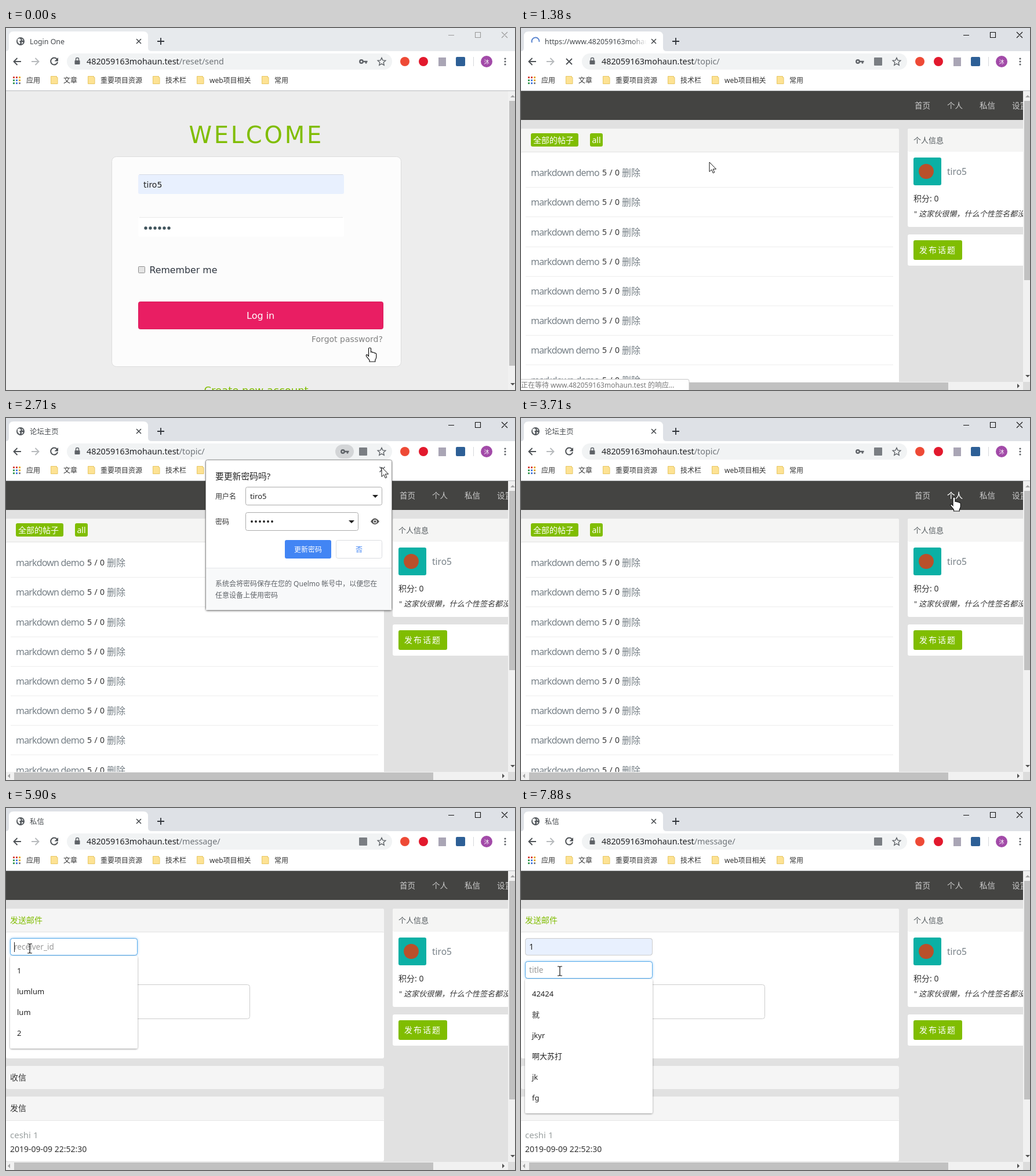
Write an HTML page that moves like this. It is 878 px wide and 626 px high and loops after 7.99 s.

```html
<!DOCTYPE html>
<html lang="zh">
<head>
<meta charset="utf-8">
<title>Login</title>
<style>
html,body{margin:0;width:100%;height:100%;overflow:hidden}
svg{display:block;width:878px;height:626px;font-family:"Noto Sans","Noto Sans CJK SC",sans-serif}
.wide{font-family:"DejaVu Sans",sans-serif}
text{white-space:pre}
</style>
</head>
<body>
<svg id="stage" viewBox="0 0 878 626" xmlns="http://www.w3.org/2000/svg"></svg>
<script>
const LOOP = 7990, ACTIVE = 735, TOPIC = 1290, POPUP = 1690, CLOSE = 2880, MSG = 4960;
const FOCUS1 = 5560, PICK = 6550, FOCUS2 = 7000;
const GREEN = '#80bd01', HOST = '482059163mohaun.test', USER = 'tiro5';

// Drawing helpers
const rect = (x, y, w, h, fill, more = '') =>
  `<rect x="${x}" y="${y}" width="${w}" height="${h}" fill="${fill}" ${more}/>`;
const text = (x, y, s, size = 14, fill = '#333', more = '') =>
  `<text x="${x}" y="${y}" font-size="${size}" fill="${fill}" ${more}>${s}</text>`;
const line = (d, stroke, width = 1, more = '') =>
  `<path d="${d}" fill="none" stroke="${stroke}" stroke-width="${width}" ${more}/>`;
const fill = (d, color, more = '') => `<path d="${d}" fill="${color}" ${more}/>`;
const dot = (x, y, r, color, more = '') => `<circle cx="${x}" cy="${y}" r="${r}" fill="${color}" ${more}/>`;
const group = (body, more = '') => `<g ${more}>${body}</g>`;
const during = (spans, body, more = '') => group(body, `data-on="${spans}" ${more}`);
const repeat = (n, f) => Array.from({length: n}, (_, i) => f(i)).join('');

function scrollbars(thumbEnd, wide) {
  const end = wide ? 612 : 626;
  let s = rect(866, 109, 12, end - 109, '#f1f1f1') + rect(868, 126, 10, thumbEnd - 126, '#c1c1c1') +
    fill('M870 120h8l-4-4z', '#a3a3a3') + fill(`M870 ${end - 12}h8l-4 4z`, '#505050');
  if (wide) s += rect(0, 612, 866, 14, '#f1f1f1') + rect(14, 613, 723, 13, '#c1c1c1') +
    rect(866, 612, 12, 14, '#dcdcdc') + fill('M7 615v8l-4-4z', '#a3a3a3') + fill('M856 615v8l4-4z', '#505050');
  return s;
}

function login() {
  return rect(0, 109, 878, 517, '#ededed') + group(
    text(315.5, 199, 'WELCOME', 40, GREEN, 'letter-spacing="3.75"') +
    rect(182.5, 222.5, 499, 363, '#fcfcfc', 'rx="8" stroke="#dcdcdc"') +
    rect(228, 253, 355, 34, '#e8f0fe', 'rx="3"') + line('M230 253.5H581', '#d5dae4') +
    text(237, 276, USER, 14, '#222') +
    rect(228, 327, 355, 34, '#fff', 'rx="3"') + line('M230 327.5H581', '#e8e8e8') +
    repeat(6, i => dot(241 + i * 8, 346, 2.7, '#40545c')) +
    rect(228.5, 412.5, 11, 11, '#e4e4e4', 'rx="1" stroke="#8e8e8e"') +
    text(247.5, 424, 'Remember me', 15.8, '#2f3640') +
    rect(228.5, 473.5, 422, 47, '#e91e63', 'rx="3" stroke="#d81b5c"') +
    rect(228, 473, 423, 48, '#070f47', 'rx="3" id="navy"') +
    during(`${ACTIVE}-${TOPIC}`, rect(228, 473, 423, 48, 'none', 'rx="3" stroke="#8ba0dc" stroke-width="1.5"')) +
    text(415, 503, 'Log in', 16, '#fff') +
    text(527, 543, 'Forgot password?', 14, '#808080') +
    text(341.5, 633, 'Create new account', 18, GREEN), 'class="wide"') +
    scrollbars(584, false);
}

const nav = ['首页', '个人', '私信', '设置'];
function frame() {
  return rect(0, 109, 878, 517, '#e1e1e1') + rect(0, 109, 878, 50, '#444442') +
    nav.map((s, i) => text(679 + i * 56, 139, s, 13.5, '#ccc')).join('') +
    rect(667, 174, 220, 170, '#fff', 'rx="3"') + rect(667, 174, 220, 40, '#f5f5f4', 'rx="3"') +
    text(677, 199, '个人信息', 13, '#51585c') +
    rect(677, 224, 48, 48, '#0bb0a5', 'rx="3"') + dot(699, 248, 13, '#b9502a') +
    text(735, 254, USER, 15.5, '#778087') +
    text(677, 300, '积分: 0') +
    text(678, 326, '"', 13) +
    text(686, 326, '这家伙很懒，什么个性签名都没有"', 13.1, '#333', 'font-style="italic"') +
    rect(667, 357, 220, 54, '#fff', 'rx="3"') + rect(677, 367, 84, 34, GREEN, 'rx="3"') +
    text(687, 389, '发布话题', 14, '#fff', 'letter-spacing="2" font-weight="500"');
}

function topic() {
  return rect(0, 174, 652, 452, '#fff', 'rx="3"') + rect(0, 174, 652, 40, '#f5f5f4', 'rx="3"') +
    line('M0 214.5H652', '#e2e2e2') +
    rect(17, 182, 82, 23, GREEN, 'rx="3"') + text(21, 199, '全部的帖子', 14, '#fff') +
    rect(119, 182, 22, 23, GREEN, 'rx="3"') + text(122.5, 199, 'all', 14, '#fff') +
    repeat(8, i => {
      const y = 256 + Math.round(i * 51.2 + .15);
      return text(17, y, 'markdown demo', 16, '#778087', 'letter-spacing="-.82"') +
        text(140, y - 1, '5 / 0', 14, '#333', 'letter-spacing=".4"') + text(174, y, '删除', 16, '#778087') +
        line(`M8 ${y + 19.5}H642`, '#ededed');
    }) + scrollbars(436, true);
}

const field = y => rect(7.5, y + .5, 219, 29, '#fff', 'rx="4" stroke="#ccc"');
const focused = y => rect(7.5, y + .5, 219, 29, '#fff', 'rx="4" stroke="#58abec" filter="url(#glow)"');
const menu = (y, h, items) => rect(7, y, 220, h, '#fff', 'rx="3" filter="url(#shade)"') +
  items.map((s, i) => text(19, y + 30 + i * 36, s, 13, '#222')).join('');
const caret = (y, id) => line(`M14.5 ${y}v17`, '#222', 1, `id="${id}"`);

function message() {
  const filled = rect(7.5, 225.5, 219, 29, '#e8f0fe', 'rx="4" stroke="#ccc"') + text(14, 245, '1', 14, '#222');
  const hint1 = text(14, 245, 'receiver_id', 13.6, '#999'), hint2 = text(14, 285, 'title', 13.6, '#999');
  return rect(0, 174, 652, 259, '#fff', 'rx="3"') + rect(0, 174, 652, 40, '#f5f5f5', 'rx="3"') +
    line('M0 214.5H652', '#e2e2e2') + text(7, 199, '发送邮件', 14, GREEN) +
    rect(0, 446, 652, 40, '#f5f5f5', 'rx="3"') + text(7, 471, '收信') +
    rect(0, 499, 652, 112, '#fff', 'rx="3"') + rect(0, 499, 652, 41, '#f5f5f5', 'rx="3"') +
    line('M0 540.5H652', '#e6e6e6') + text(7, 524, '发信') +
    text(7, 571, 'ceshi 1', 15, '#9aa0a0') + text(7, 595, '2019-09-09 22:52:30') +
    rect(7.5, 305.5, 413, 59, '#fff', 'rx="4" stroke="#ccc"') +
    field(225) + hint1 + field(265) + hint2 +
    during(`${FOCUS1}-6220`, focused(225) + hint1 + caret(232, 'caret1')) +
    during(`6220-${LOOP}`, filled) +
    during(`${FOCUS1}-${PICK}`, menu(256, 160, ['1', 'lumlum', 'lum', '2'])) +
    during(`6220-${PICK}`, rect(7, 264, 220, 36, '#eee') + text(19, 286, '1', 13, '#222')) +
    during(`${FOCUS2}-${LOOP}`, focused(265) + hint2 + caret(272, 'caret2') +
      menu(296, 232, ['42424', '就', 'jkyr', '啊大苏打', 'jk', 'fg'])) +
    scrollbars(504, true);
}

function popup() {
  const box = (x, y, w, c = '#aaa') => rect(x + .5, y + .5, w - 1, 31, '#fff', `rx="3" stroke="${c}"`);
  return rect(344.5, 72.5, 321, 260, '#fff', 'rx="3" stroke="#959595" filter="url(#shade)"') +
    rect(345, 260, 320, 72, '#f8f9fa') + line('M345 259.5H665', '#e4e6e9') +
    text(361, 106, '要更新密码吗?', 14.8, '#222') +
    line('M644.5 84.5l9 9m0-9l-9 9', '#5f6368', 1.7) +
    text(361, 140, '用户名', 12) + box(413, 119, 236) + text(421, 140, USER, 13, '#222') +
    text(361, 184, '密码', 12) + box(413, 163, 195) + repeat(6, i => dot(424 + i * 7, 179, 1.9, '#222')) +
    fill('M632 133h10l-5 5zM591 177h10l-5 5z', '#222') +
    fill('M629 179q7-11 15 0q-8 10-15 0z', '#555') + dot(636.5, 179, 3.2, '#fff') + dot(636.5, 179, 1.9, '#555') +
    rect(481, 211, 80, 32, '#4285f4', 'rx="3"') + text(497, 232, '更新密码', 12, '#fff', 'font-weight="500"') +
    box(569, 211, 80, '#dadce0') + text(603, 232, '否', 12, '#4285f4') +
    text(361, 291, '系统会将密码保存在您的 Quelmo 帐号中，以便您在', 12, '#5f6368') +
    text(361, 311, '任意设备上使用密码', 12, '#5f6368');
}

const keyIcon = x => dot(x - 3, 58, 2.7, 'none', 'stroke="#5f6368" stroke-width="2.4"') +
  line(`M${x} 58H${x + 7.5}M${x + 5} 58v3.5`, '#5f6368', 2.6);
const url = path => text(139, 63, `${HOST}<tspan fill="#70757a">${path}</tspan>`, 14.35, '#202124');
const tabTitle = s => text(41, 28, s, 12.4, '#45494d');

function chrome() {
  const tile = ['#d8433b', '#d8433b', '#e6a817', '#3d9b56', '#4a7de0', '#e6a817', '#3d9b56', '#4a7de0', '#888'];
  const marks = [[77, '文章'], [141, '重要项目资源'], [253, '技术栏'], [329, 'web项目相关'], [441, '常用']];
  const idle = `0-780,1700-4700,5300-${LOOP}`, busy = '780-1700,4700-5300';
  const buttons = c => line('M763 12.5h10M809.5 7.5h9v9h-9zM855 7l10 10m0-10l-10 10', c, 1.1);
  return rect(0, 0, 878, 40, '#dee1e6') + during(`0-${ACTIVE}`, rect(0, 0, 878, 40, '#e7eaed')) +
    fill('M0 40q5 0 5-6V14q0-8 8-8h224q8 0 8 8v20q0 6 6 6z', '#fff') + rect(0, 40, 878, 68, '#fff') +
    line('M0 108.5H878', '#b9bbbe') +
    during(idle, dot(25, 23, 7, '#53585d') +
      fill('M20 19l4-1 2 3-3 2 2 3-2 2-3-4zM27 18l3 3-2 1zM27 24l3 1-3 3z', '#fff')) +
    during(busy, line('M25 16.5a6.5 6.5 0 1 1-.01 0', '#a4a8ac', 2, 'id="spin" pathLength="100"')) +
    during(`0-${TOPIC}`, tabTitle('Login One')) +
    during(`${TOPIC}-1700`, group(tabTitle('https://www.' + HOST) + rect(190, 12, 27, 22, 'url(#fade)'), 'clip-path="url(#tab)"')) +
    during(`1700-${MSG}`, tabTitle('论坛主页')) + during(`${MSG}-${LOOP}`, tabTitle('私信')) +
    line('M225 19l8 8m0-8l-8 8', '#45494d', 1.6) + line('M261 23h12M267 17v12', '#30343a', 1.8) +
    during(`0-${ACTIVE}`, buttons('#999')) + during(`${ACTIVE}-${LOOP}`, buttons('#111')) +
    line('M26 58H13.5m6-6l-6 6 6 6', '#4e5256', 1.9) + line('M44 58H56.5m-6-6l6 6-6 6', '#b7babd', 1.9) +
    during(idle, line('M88 54a6 6 0 1 0 1 5', '#4e5256', 2) + fill('M90 51v6.5h-6.5z', '#4e5256')) +
    during(busy, line('M78 53l10 10m0-10l-10 10', '#4e5256', 1.9)) +
    rect(105, 44, 561, 28, '#f1f3f4', 'rx="14"') +
    rect(118.5, 56, 9, 7, '#5f6368', 'rx="1"') + line('M120.5 56v-2a2.5 2.5 0 0 1 5 0v2', '#5f6368', 1.5) +
    during(`0-${TOPIC}`, url('/reset/send') + keyIcon(616)) +
    during(`${POPUP}-${CLOSE}`, rect(568, 46, 32, 24, '#d3d5d7', 'rx="12"')) +
    during(`${TOPIC}-${MSG}`, url('/topic/') + keyIcon(584)) + during(`${MSG}-${LOOP}`, url('/message/')) +
    during(`${TOPIC}-${LOOP}`, rect(609, 51, 14, 14, '#7a7e83', 'rx="1"')) +
    line('M648 51.5l2 4.4 4.8.5-3.6 3.2 1 4.8-4.2-2.5-4.2 2.5 1-4.8-3.6-3.2 4.8-.5z', '#5f6368', 1.4) +
    dot(688, 58, 8, '#ee4a36') + dot(720, 58, 8, '#e2192d') +
    rect(746, 51, 13, 15, '#a9a5b5') + rect(776, 50, 16, 16, '#2d5f96', 'rx="2"') +
    line('M806.5 50v16', '#d5d7da') + dot(829, 58, 10, '#a24aa8') + text(824.5, 61.5, '沐', 9, '#fff') +
    repeat(3, i => dot(861, 53 + i * 5, 1.6, '#5f6368')) +
    tile.map((c, i) => rect(12 + i % 3 * 5, 84 + (i / 3 | 0) * 5, 3, 3, c)).join('') + text(35, 95, '应用', 12) +
    marks.map(([x, s]) => fill(`M${x + .5} 83.5h10v2h1.5v11h-11.5z`, '#fde293', 'stroke="#e6c766"') +
      text(x + 22, 95, s, 12)).join('');
}

const bubble = (s, id) => group(rect(-4, 607.5, 294, 24, '#fff', 'rx="3" stroke="#c6c6c6"') +
  text(0, 622, s, 12, '#777'), `id="${id}"`);

stage.innerHTML = `<defs>
  <filter id="shade" x="-10%" y="-10%" width="120%" height="125%"><feDropShadow dx="0" dy="1" stdDeviation="1.8" flood-opacity=".4"/></filter>
  <filter id="glow" x="-5%" y="-30%" width="110%" height="160%"><feDropShadow dx="0" dy="0" stdDeviation="2" flood-color="#52a8ec" flood-opacity=".6"/></filter>
  <linearGradient id="fade"><stop stop-color="#fff" stop-opacity="0"/><stop offset="1" stop-color="#fff"/></linearGradient>
  <clipPath id="tab"><rect x="41" y="8" width="176" height="30"/></clipPath>
  </defs>` +
  during(`0-${TOPIC}`, login()) +
  during(`${TOPIC}-${LOOP}`, frame()) +
  during('3600-4080', text(735, 139, nav[1], 13.5, '#fff')) +
  during(`4150-${MSG}`, text(791, 139, nav[2], 13.5, '#fff')) +
  during(`${TOPIC}-${MSG}`, topic()) + during(`${MSG}-${LOOP}`, message()) +
  during('960-1680', bubble(`正在等待 www.${HOST} 的响应...`, 'wait')) +
  during('1780-2050', bubble(`https://www.${HOST}/topic/dele...`, 'link')) +
  during('3830-5100', bubble(`https://www.${HOST}/message/`, 'go')) +
  chrome() + during(`${POPUP}-${CLOSE}`, popup()) +
  group(
    fill('M-2 14.5V1.5Q-2 0 0 0T2 1.5V7.5Q4 6.5 5.3 8.3Q7 7.4 8.3 9.2Q11 8.6 11.3 11.5V16Q11 19 9.3 21V24H-.5V21.5L-6 14.5Q-6.7 11.6-4.5 12Z', '#fff', 'class="hand" stroke="#111" stroke-width="1.2"') +
    fill('M0 0V16.5L3.8 12.9 6.3 18.8 8.8 17.7 6.3 12H11.6Z', '#fff', 'class="arrow" stroke="#111"') +
    line('M-4-8H-1L0-7 1-8H4M0-7V7M-4 8H-1L0 7 1 8H4', '#111', 1.2, 'class="beam"'), 'id="cursor"');

// time, x, y, shape from that time on
const path = [
  [0, 627.5, 553, 'hand'], [100, 627.5, 553, 'arrow'], [310, 570, 518, 'hand'], [630, 369, 474, 'hand'],
  [1180, 369, 474, 'arrow'], [1375, 325, 232, 'arrow'], [1500, 325, 232, 'arrow'], [1790, 198, 392, 'hand'],
  [1940, 198, 392, 'arrow'], [2500, 648, 85, 'arrow'], [2950, 648, 85, 'arrow'], [3490, 662, 140, 'arrow'],
  [3600, 710, 138, 'hand'], [3700, 747, 137, 'hand'], [3920, 747, 137, 'hand'], [4300, 802, 136, 'hand'],
  [4960, 802, 136, 'arrow'], [5320, 41, 243, 'beam'], [6090, 41, 243, 'beam'], [6210, 48, 268, 'arrow'],
  [6340, 52, 280, 'arrow'], [6560, 52, 280, 'beam'], [6900, 70, 285, 'beam'], [7450, 70, 285, 'beam'],
  [7660, 72, 282, 'beam'], [7870, 67, 282, 'beam'], [LOOP, 67, 282, 'beam']
];

const $ = id => document.getElementById(id);
const clamp = v => Math.max(0, Math.min(1, v));
const timed = [...document.querySelectorAll('[data-on]')].map(el =>
  [el, el.dataset.on.split(',').map(s => s.split('-').map(Number))]);
const shapes = [...$('cursor').children];

function draw(now) {
  const t = now % LOOP;
  for (const [el, spans] of timed)
    el.style.display = spans.some(([a, b]) => t >= a && t < b) ? '' : 'none';

  const i = path.findIndex((p, k) => k && t < p[0]);
  const [a, b] = [path[i - 1], path[i]];
  const k = clamp((t - a[0]) / (b[0] - a[0])), e = k * k * (3 - 2 * k);
  $('cursor').setAttribute('transform', `translate(${a[1] + (b[1] - a[1]) * e} ${a[2] + (b[2] - a[2]) * e})`);
  for (const s of shapes) s.style.display = s.classList.contains(a[3]) ? '' : 'none';

  $('navy').setAttribute('opacity', clamp((t - 320) / 300));
  $('link').setAttribute('opacity', .45 * clamp((2050 - t) / 120));
  $('go').setAttribute('opacity', clamp((t - 3830) / 200));
  $('caret1').style.opacity = (t - FOCUS1) % 1060 < 530 ? 1 : 0;
  $('caret2').style.opacity = (t - FOCUS2) % 1060 < 530 ? 1 : 0;

  const first = t < 3000, commit = first ? TOPIC : MSG, age = t - (first ? 780 : 4700);
  const blue = t >= commit, spin = $('spin');
  const turn = blue ? -110 + (t - commit - 90) * .36 : -age * .3;
  spin.setAttribute('stroke', blue ? '#5b86d0' : '#a4a8ac');
  spin.setAttribute('stroke-dasharray', blue ? '58 42' : `${Math.max(5, Math.min(60, age / 8))} 100`);
  spin.setAttribute('transform', `rotate(${turn} 25 23)`);
}

let start;
function tick(now) {
  start ??= now;
  draw(now - start);
  requestAnimationFrame(tick);
}
draw(0);
requestAnimationFrame(tick);
</script>
</body>
</html>
```
